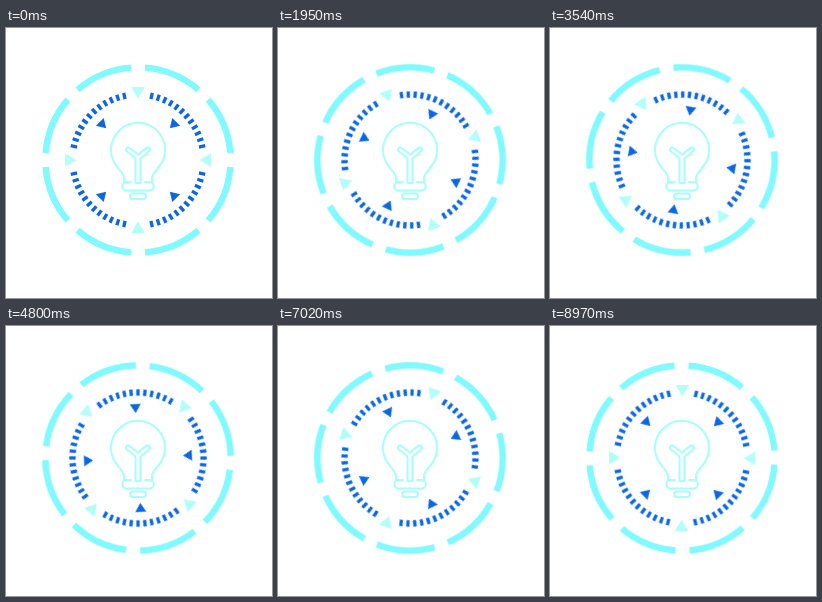
Animation of 266 by 270 pixels, one loop 9 s. Source, as an HTML page:

```html
<!DOCTYPE html>
<html lang="en">
<head>
<meta charset="utf-8">
<title>Idea dial</title>
<style>
  html, body { margin: 0; width: 100%; height: 100%; overflow: hidden; background: #fff; }
  svg { display: block; width: 266px; height: 270px; }
  .spin { animation: turn 9s steps(300) infinite; }
  .back { animation-direction: normal; animation-name: turn-back; }
  @keyframes turn { to { transform: rotate(90deg); } }
  @keyframes turn-back { to { transform: rotate(-90deg); } }
  .ring { fill: none; stroke: #80f9ff; stroke-width: 6.4; }
  .tick { stroke: #0a67e4; stroke-width: 3.3; }
  .light { fill: #b2fff8; }
  .dark { fill: #0a67e4; }
  .bulb { fill: none; stroke: #a5fffb; stroke-width: 2; stroke-linecap: round; stroke-linejoin: round; }
</style>
</head>
<body>
<svg viewBox="0 0 266 270">
  <g transform="translate(132 132)">
    <g class="spin" id="outer"></g>
    <g class="spin back" id="inner"></g>
  </g>
  <g class="bulb">
    <path d="M118 154V150C118 146 115 144 112 140A27 27 0 1 1 152 140C149 144 146 146 146 150V154"/>
    <path d="M125 154H120.500A4 4 0 0 0 120.500 162.500H143.500A4 4 0 0 0 143.500 154H139"/>
    <rect x="124" y="165.500" width="16" height="5.500" rx="2.750"/>
    <path d="M129.500 155V130.500L120.800 123.300A2.200 2.200 0 0 1 123.600 119.900L132 126.500L140.400 119.900A2.200 2.200 0 0 1 143.200 123.300L134.500 130.500V155Z"/>
  </g>
</svg>
<script>
  const outer = document.getElementById('outer');
  const inner = document.getElementById('inner');

  function add(parent, cls, d, angle) {
    const path = document.createElementNS('http://www.w3.org/2000/svg', 'path');
    path.setAttribute('class', cls);
    path.setAttribute('d', d);
    path.setAttribute('transform', `rotate(${angle})`);
    parent.append(path);
  }

  // Arc centred on twelve o'clock, spanning half degrees to each side.
  function arc(r, half) {
    const a = half * Math.PI / 180;
    const x = r * Math.sin(a), y = -r * Math.cos(a);
    return `M${-x} ${y}A${r} ${r} 0 0 1 ${x} ${y}`;
  }

  // Triangle pointing at the centre.
  const wedge = (base, tip, w) => `M${-w / 2} ${-base}H${w / 2}L0 ${-tip}Z`;

  for (let i = 0; i < 8; i++) add(outer, 'ring', arc(92.6, 18.2), 22.5 + i * 45);

  for (let q = 0; q < 360; q += 90) {
    add(inner, 'light', wedge(73, 61.5, 13.6), q);
    add(inner, 'dark', wedge(54, 45, 11), q + 45);
    for (let i = 0; i < 12; i++) add(inner, 'tick', 'M0 -62.300V-68.700', q + 12 + i * 6);
  }
</script>
</body>
</html>
```
